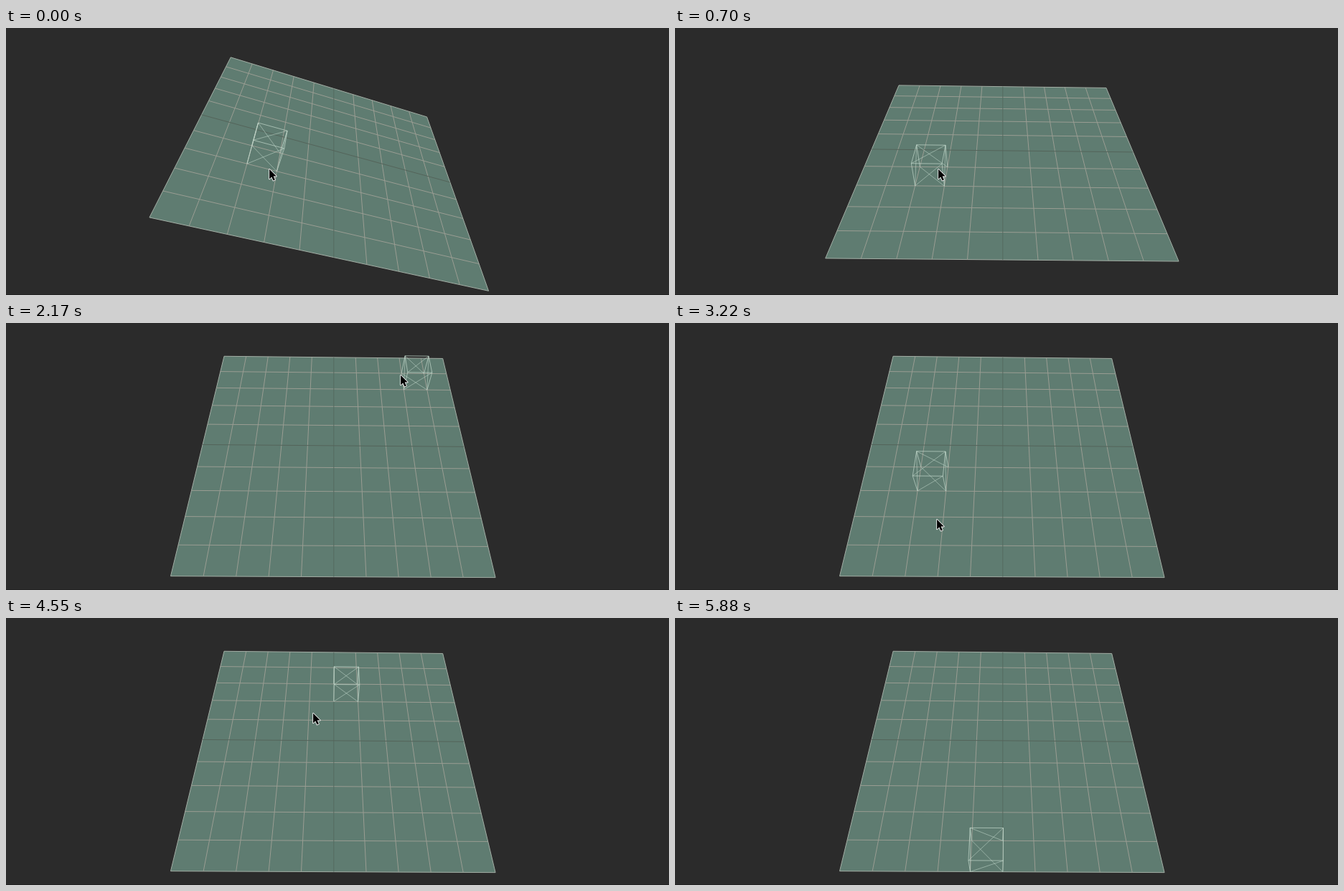
An HTML page with a canvas for the animation above (6230 ms loop, 924x372 px).

```html
<!DOCTYPE html>
<html lang="en">
<head>
<meta charset="utf-8">
<title>Grid cursor</title>
<style>
  html, body { margin: 0; width: 100%; height: 100%; overflow: hidden; background: #2b2b2b; }
  canvas { display: block; width: 924px; height: 372px; }
</style>
</head>
<body>
<canvas id="stage" width="924" height="372"></canvas>
<script>
const ctx = document.getElementById('stage').getContext('2d');
const LOOP = 6230, STEP = 70;
const CENTER_X = 456.8, CENTER_Y = 170.9, FOCAL = 550, DISTANCE = 15.1;
const LAG = 2, POINTER_END = 78;

// Turning points of the pointer: step, x, y.
const stops = [
  [20, 366.5, 196], [28, 572, 80], [31, 549.5, 72], [34, 375, 125], [38, 505, 78],
  [42, 337, 150], [46, 364.5, 273], [52, 595, 325], [56, 605, 219], [60, 520, 70],
  [65, 427.5, 132], [70, 390, 290], [74, 400, 130], [78, 435, 292], [84, 435, 325]
];

const clamp = u => Math.min(1, Math.max(0, u));
const smooth = u => u * u * (3 - 2 * u);
const dot = (a, b) => a[0] * b[0] + a[1] * b[1] + a[2] * b[2];

function pointerAt(step) {
  const next = stops.findIndex(s => s[0] > step);
  if (next === 0) return stops[0].slice(1);
  if (next < 0) return stops[stops.length - 1].slice(1);
  const a = stops[next - 1], b = stops[next];
  const u = (step - a[0]) / (b[0] - a[0]);
  return [1, 2].map(i => a[i] + (b[i] - a[i]) * u);
}

// The board rolls level, then stands up with a small overshoot.
function boardAxes(step) {
  const over = Math.sin(Math.PI * clamp((step - 12) / 6));
  const lean = -.927 + .296 * smooth(clamp((step - 9) / 6)) + .024 * over;
  const roll = .0135 + .357 * Math.exp(-(((step - 1.2) / 3.35) ** 2)) + .0105 * over;
  const sl = Math.sin(lean), cl = Math.cos(lean);
  const sr = Math.sin(roll), cr = Math.cos(roll);
  return [[cr, sr * sl, -sr * cl], [0, cl, sl], [sr, -cr * sl, cr * cl]];
}

function projector([ax, ay, az]) {
  return ([x, y, z]) => {
    const [px, py, pz] = [0, 1, 2].map(i => x * ax[i] + y * ay[i] + z * az[i]);
    const scale = FOCAL / (DISTANCE - pz);
    return [CENTER_X + px * scale, CENTER_Y - py * scale];
  };
}

// Casts a ray through a screen point and returns the board cell it hits.
function cellUnder([sx, sy], [ax, ay, az]) {
  const ray = [(sx - CENTER_X) / FOCAL, (CENTER_Y - sy) / FOCAL, -1];
  const t = -DISTANCE * az[2] / dot(az, ray);
  const hit = [t * ray[0], t * ray[1], DISTANCE - t];
  return [ax, ay].map(axis => Math.floor(dot(hit, axis)));
}

function line(project, a, b, color) {
  ctx.beginPath();
  ctx.moveTo(...project(a));
  ctx.lineTo(...project(b));
  ctx.strokeStyle = color;
  ctx.stroke();
}

function drawBoard(project) {
  ctx.beginPath();
  for (const p of [[-5, 5, 0], [5, 5, 0], [5, -5, 0], [-5, -5, 0]]) ctx.lineTo(...project(p));
  ctx.fillStyle = '#5f7c71';
  ctx.fill();
  for (let i = -5; i <= 5; i++) {
    if (i === 0) continue;
    const color = Math.abs(i) === 5 ? '#a3aea5' : '#9a9d93';
    line(project, [i, -5, 0], [i, 5, 0], color);
    line(project, [-5, i, 0], [5, i, 0], color);
  }
  line(project, [0, -5, 0], [0, 5, 0], '#566a60');
  line(project, [-5, 0, 0], [5, 0, 0], '#54645a');
}

// Corner bits: 1 = right, 2 = far, 4 = top. Base edges lie on the grid lines.
const edges = [];
for (let i = 0; i < 8; i++) {
  for (const bit of [1, 2, 4]) if (!(i & bit) && (i | bit) > 3) edges.push([i, i | bit]);
}
const diagonals = [[4, 7], [1, 2], [0, 5], [6, 3], [1, 7], [0, 6]];

function drawCube(project, [x, y]) {
  const corner = i => [x + (i & 1), y + (i >> 1 & 1), i >> 2];
  for (const [a, b] of edges) line(project, corner(a), corner(b), 'rgba(194,215,203,.7)');
  for (const [a, b] of diagonals) line(project, corner(a), corner(b), 'rgba(194,215,203,.55)');
}

const arrow = new Path2D('M0 0V15.2L3.5 11.9L6 17.5L8.7 16.3L6.2 10.9H10.8Z');

function drawPointer([x, y]) {
  ctx.save();
  ctx.translate(x + .6, y + .8);
  ctx.scale(.9, .9);
  ctx.lineWidth = 1.8;
  ctx.lineJoin = 'round';
  ctx.strokeStyle = '#fff';
  ctx.stroke(arrow);
  ctx.fillStyle = '#000';
  ctx.fill(arrow);
  ctx.restore();
}

const start = performance.now();

function draw() {
  const step = Math.floor((performance.now() - start) % LOOP / STEP);
  const axes = boardAxes(step), project = projector(axes);
  ctx.fillStyle = '#2b2b2b';
  ctx.fillRect(0, 0, 924, 372);
  ctx.fillStyle = '#232323';
  ctx.fillRect(0, 371, 924, 1);
  drawBoard(project);
  // The cube follows the pointer a little late.
  drawCube(project, cellUnder(pointerAt(step - LAG), axes));
  if (step < POINTER_END) drawPointer(pointerAt(step));
  requestAnimationFrame(draw);
}
draw();
</script>
</body>
</html>
```
